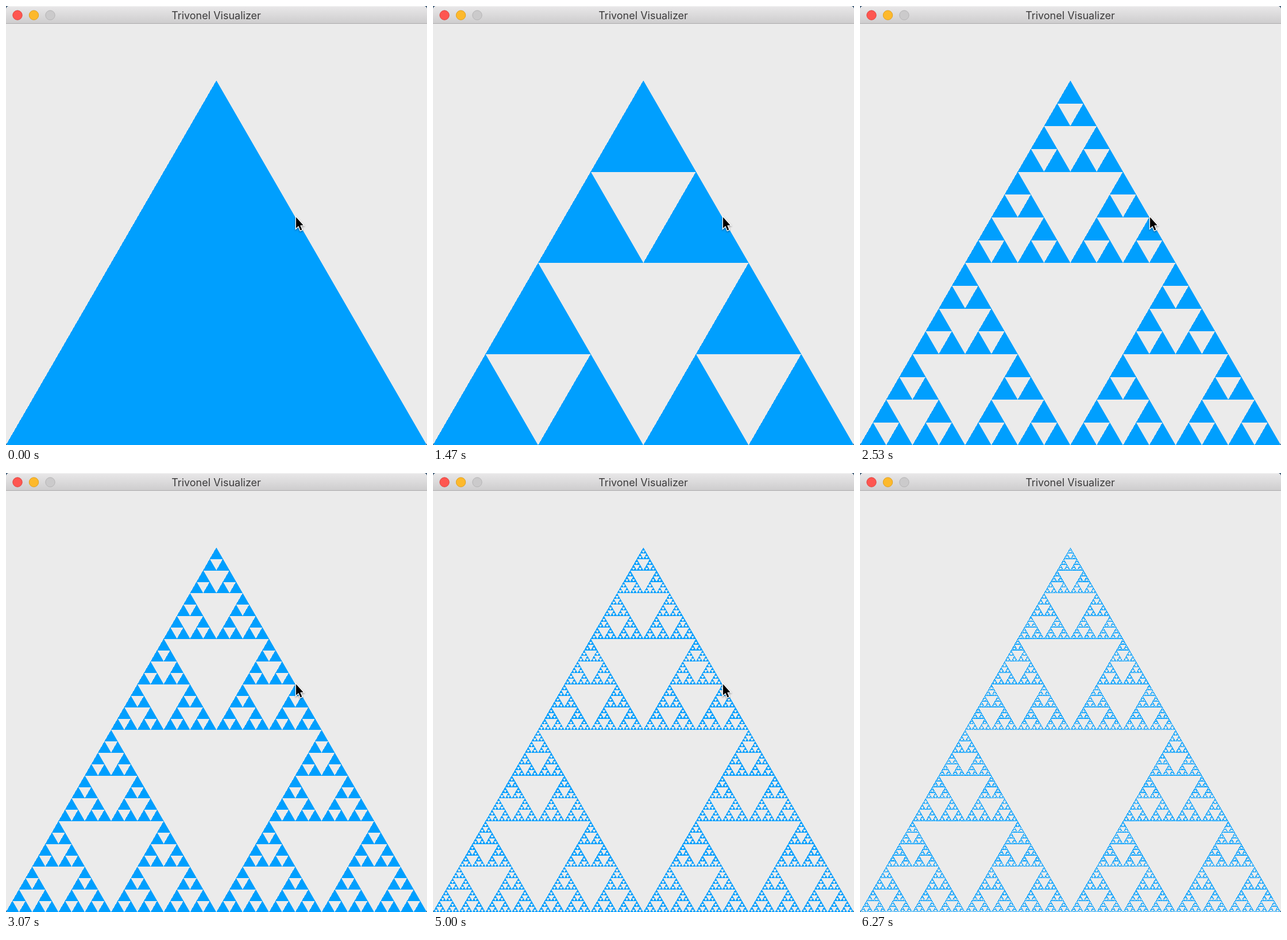
Write an HTML page with a canvas that moves like this. It is 733 px wide and 764 px high and loops after 6340 ms.

```html
<!DOCTYPE html>
<html lang="en">
<head>
<meta charset="utf-8">
<title>Trivonel Visualizer</title>
<style>
  html, body { margin: 0; width: 100%; height: 100%; overflow: hidden; background: #3d5a75; }
  canvas { display: block; }
</style>
</head>
<body>
<canvas id="stage" width="733" height="764"></canvas>
<script>
const W = 733, H = 764, LOOP = 6340;
const APEX_Y = 130, SLOPE = Math.sqrt(3) / 2;
const BLUE = '#009ffe';
// Times at which the recursion gets one level deeper
const STEPS = [930, 1470, 1870, 2530, 3000, 3730, 4270, 5130];
const CURSOR_END = 5130;
const CURSOR = [[505, 367.5], [505, 386.8], [509.3, 382.8], [512.6, 390.5],
                [515.4, 389.3], [512.2, 381.8], [517.6, 381.4]];

const ctx = document.getElementById('stage').getContext('2d');

// Row by row: hard left edge, soft right edge
function triangle(cx, top, side) {
  const bottom = top + side * SLOPE;
  for (let y = Math.round(top); y + 0.5 <= bottom; y++) {
    const half = (y + 0.5 - top) / SLOPE / 2;
    if (half <= 0) continue;
    const left = Math.floor(cx - half);
    ctx.fillRect(left, y, cx + half - left, 1);
  }
}

function sierpinski(cx, top, side, depth) {
  if (depth === 0) return triangle(cx, top, side);
  const half = side / 2, mid = top + half * SLOPE;
  sierpinski(cx, top, half, depth - 1);
  sierpinski(cx - half / 2, mid, half, depth - 1);
  sierpinski(cx + half / 2, mid, half, depth - 1);
}

function light(x, fill, rim) {
  ctx.beginPath();
  ctx.arc(x, 16, 8.2, 0, Math.PI * 2);
  ctx.fillStyle = fill;
  ctx.fill();
  ctx.strokeStyle = rim;
  ctx.lineWidth = 1;
  ctx.stroke();
}

function titleBar() {
  const shade = ctx.createLinearGradient(0, 0, 0, 30);
  shade.addColorStop(0, '#e9e8e9');
  shade.addColorStop(1, '#cecdce');
  ctx.fillStyle = shade;
  ctx.fillRect(0, 0, W, 30);
  ctx.fillStyle = '#f5f5f5';
  ctx.fillRect(0, 0, W, 1);
  ctx.fillStyle = '#acabac';
  ctx.fillRect(0, 30, W, 1);

  light(20, '#fe5650', '#e0443e');
  light(48.5, '#fdb92c', '#dfa023');
  light(77, '#cbcacb', '#b6b5b6');

  ctx.fillStyle = '#3c3b3c';
  ctx.font = '18px Inter, sans-serif';
  ctx.textAlign = 'center';
  ctx.fillText('Trivonel Visualizer', 366, 23);
}

function cursor() {
  ctx.save();
  ctx.beginPath();
  CURSOR.forEach(([x, y]) => ctx.lineTo(x, y));
  ctx.closePath();
  ctx.lineJoin = 'miter';
  ctx.lineWidth = 2.6;
  ctx.strokeStyle = '#fff';
  ctx.shadowColor = 'rgba(0,0,0,0.4)';
  ctx.shadowBlur = 3;
  ctx.shadowOffsetY = 1.5;
  ctx.stroke();
  ctx.shadowColor = 'transparent';
  ctx.fillStyle = '#000';
  ctx.fill();
  ctx.restore();
}

function draw(depth, showCursor) {
  ctx.clearRect(0, 0, W, H);
  ctx.save();
  ctx.beginPath();
  ctx.roundRect(0, 0, W, H, [6, 6, 4, 4]);
  ctx.clip();
  ctx.fillStyle = '#ebebeb';
  ctx.fillRect(0, 0, W, H);
  ctx.fillStyle = BLUE;
  sierpinski(W / 2, APEX_Y, W, depth);
  titleBar();
  ctx.restore();
  if (showCursor) cursor();
}

let shown = '';
function frame() {
  const t = performance.now() % LOOP;
  const depth = STEPS.filter(s => t >= s).length;
  const showCursor = t < CURSOR_END;
  const state = depth + ':' + showCursor;
  if (state !== shown) {
    shown = state;
    draw(depth, showCursor);
  }
  requestAnimationFrame(frame);
}
frame();
</script>
</body>
</html>
```
